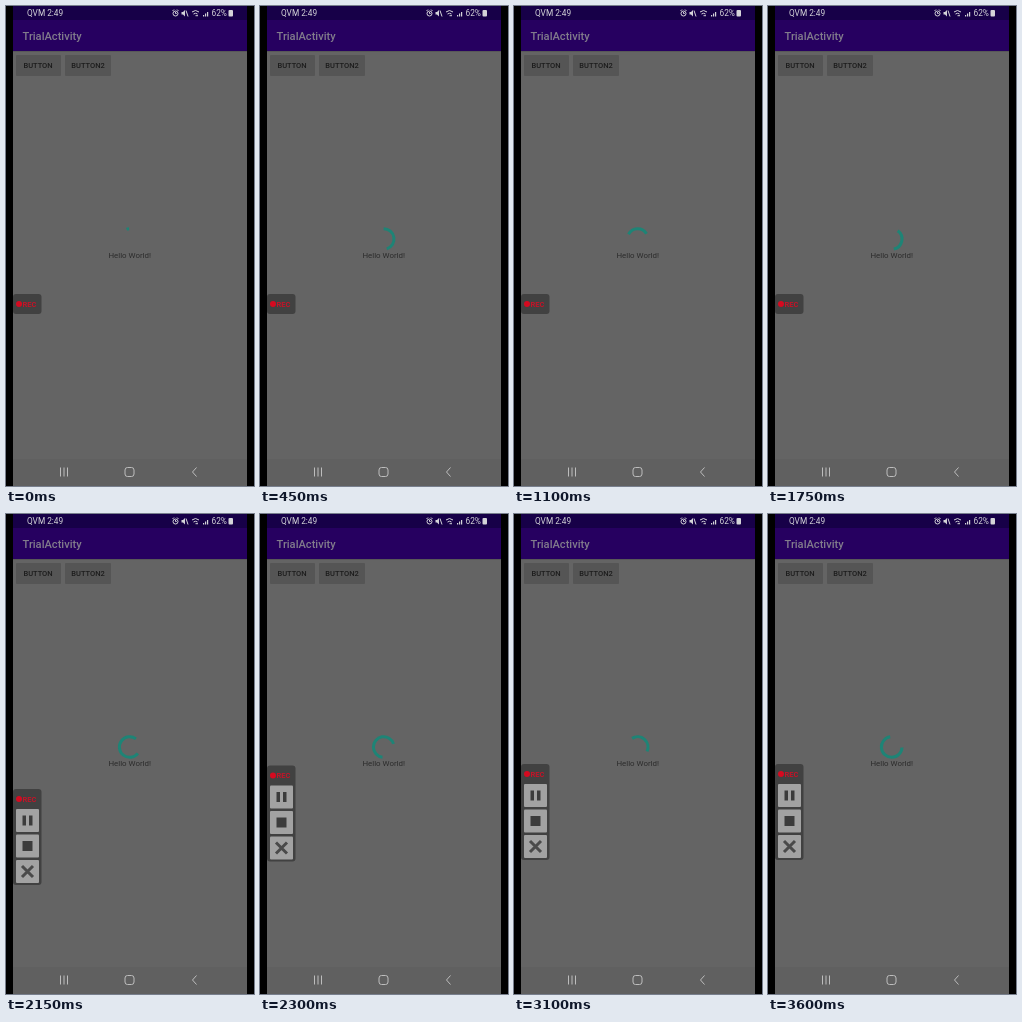
These frames come from a looping animation (248 px wide and 480 px high, 3650 ms). An HTML page:

```html
<!DOCTYPE html>
<html lang="en">
<head>
<meta charset="utf-8">
<title>Loading spinner</title>
<style>
  html, body { margin: 0; width: 100%; height: 100%; overflow: hidden; background: #000; }
  svg { display: block; width: 248px; height: 480px; font-family: Roboto, sans-serif; }
  .line { fill: none; stroke: #bdbdbd; }
</style>
</head>
<body>
<svg viewBox="0 0 248 480">
  <rect width="248" height="480"/>
  <rect x="7" width="234" height="480" fill="#646464"/>
  <rect x="7" width="234" height="14.5" fill="#170048"/>
  <rect x="7" y="14" width="234" height="31" fill="#260060"/>
  <rect x="7" y="45" width="234" height="1" fill="#585858"/>
  <rect x="7" y="453" width="234" height="27" fill="#606060"/>

  <!-- status bar -->
  <g fill="#d4d4d8" font-size="8.3">
    <text x="21" y="10">QVM 2:49</text>
    <text x="205.5" y="10">62%</text>
    <rect x="222.5" y="4" width="4.5" height="6.5" rx="1"/>
    <path d="M197 10.5V9h1.2v1.5zM199 10.5V7.5h1.2v3zM201 10.5V6h1.2v4.5z"/>
    <path d="M175.500 6h1.500l2-2v6.500l-2-2h-1.500z"/>
    <g class="line" style="stroke:#d4d4d8">
      <circle cx="169.500" cy="7.500" r="2.500"/>
      <path d="M169.500 6v1.500h1.200M166.500 5l1.500-1.500M172.500 5l-1.500-1.500M180 4.500l2 6"/>
      <path d="M186 6q3.500-3 7 0M187.500 8q2-1.500 4 0M189.500 9.700h2.500"/>
    </g>
  </g>

  <text x="16.500" y="34" font-size="11.1" font-weight="500" fill="#827c8c">TrialActivity</text>

  <g fill="#555">
    <rect x="10" y="49" width="45" height="21" rx="1"/>
    <rect x="59" y="49" width="46" height="21" rx="1"/>
  </g>
  <g font-size="7.5" font-weight="500" text-anchor="middle" fill="#1c1c1c">
    <text x="32" y="62">BUTTON</text>
    <text x="82" y="62">BUTTON2</text>
    <text x="123.700" y="252.300" font-size="7.900" font-weight="400" fill="#2c2c2c">Hello World!</text>
  </g>

  <path id="arc" fill="none" stroke="#1e8476" stroke-width="3"/>

  <!-- recorder widget -->
  <g id="recorder">
    <rect id="panel" x="7" width="28.500" height="20" rx="3" fill="#414141"/>
    <circle cx="13" cy="10" r="3" fill="#d50a20"/>
    <text x="16.500" y="12.800" font-size="7.500" font-weight="700" fill="#c21428">REC</text>
    <g id="menu">
      <g fill="#a2a2a2">
        <rect x="10" y="20" width="23" height="23" rx="1"/>
        <rect x="10" y="45.500" width="23" height="23" rx="1"/>
        <rect x="10" y="71" width="23" height="23" rx="1"/>
      </g>
      <path d="M16.500 26.500h3.500v10h-3.500zM23 26.500h3.500v10h-3.500zM16.500 52h10v10h-10z" fill="#3c3c3c"/>
      <path d="M16 77l11 11M27 77l-11 11" stroke="#4a4a4a" stroke-width="3"/>
    </g>
  </g>

  <!-- navigation bar -->
  <g class="line">
    <path d="M54.500 461.500v9M58 461.500v9M61.500 461.500v9M190.500 461.500l-4 4.500 4 4.500"/>
    <rect x="119" y="461.500" width="9" height="9" rx="2.500"/>
  </g>
</svg>
<script>
const LOOP = 3650, STEP = 50, CYCLE = 1333, PHASE = 0.86;
const TURNS = [9, -91, 97, 168]; // orientation of each sweep cycle
const MENU_OPENS = 2150;
const [arc, recorder, panel, menu] =
  ['arc', 'recorder', 'panel', 'menu'].map(id => document.getElementById(id));

const bezier = (u, a, b, c, d) =>
  a * (1 - u) ** 3 + 3 * b * u * (1 - u) ** 2 + 3 * c * u * u * (1 - u) + d * u ** 3;

// Height of the S-curve with horizontal control values xs, at position x
function ease(x, xs) {
  if (x <= xs[0]) return 0;
  if (x >= xs[3]) return 1;
  let lo = 0, hi = 1;
  for (let i = 0; i < 20; i++) {
    const mid = (lo + hi) / 2;
    if (bezier(mid, ...xs) < x) lo = mid; else hi = mid;
  }
  return bezier(lo, 0, 0, 1, 1);
}

function point(deg) {
  const a = deg * Math.PI / 180;
  return `${123.7 + 10.3 * Math.sin(a)} ${233 - 10.3 * Math.cos(a)}`;
}

function drawSpinner(t) {
  const progress = t / CYCLE + PHASE, n = Math.floor(progress), p = progress - n;
  const base = TURNS[n] + 0.162 * t + 90 * p;
  const start = base + 270 * ease(p, [0.5, 0.7, 0.6, 1]);
  const end = Math.max(base + 270 * ease(p, [0, 0.2, 0.1, 0.5]), start + 4);
  arc.setAttribute('d',
    `M${point(start)}A10.3 10.3 0 ${end - start > 180 ? 1 : 0} 1 ${point(end)}`);
}

function drawRecorder(t) {
  const open = t >= MENU_OPENS;
  const left = Math.max(0, 1 - (t - MENU_OPENS) / 200);
  recorder.setAttribute('transform', `translate(0 ${open ? 250 + 25 * left ** 2 : 288})`);
  panel.setAttribute('height', open ? 96 : 20);
  menu.setAttribute('visibility', open ? 'visible' : 'hidden');
}

const origin = performance.now();
function frame() {
  const elapsed = (performance.now() - origin) % LOOP;
  const t = Math.floor(elapsed / STEP) * STEP;
  drawSpinner(t);
  drawRecorder(t);
  requestAnimationFrame(frame);
}
frame();
</script>
</body>
</html>
```
